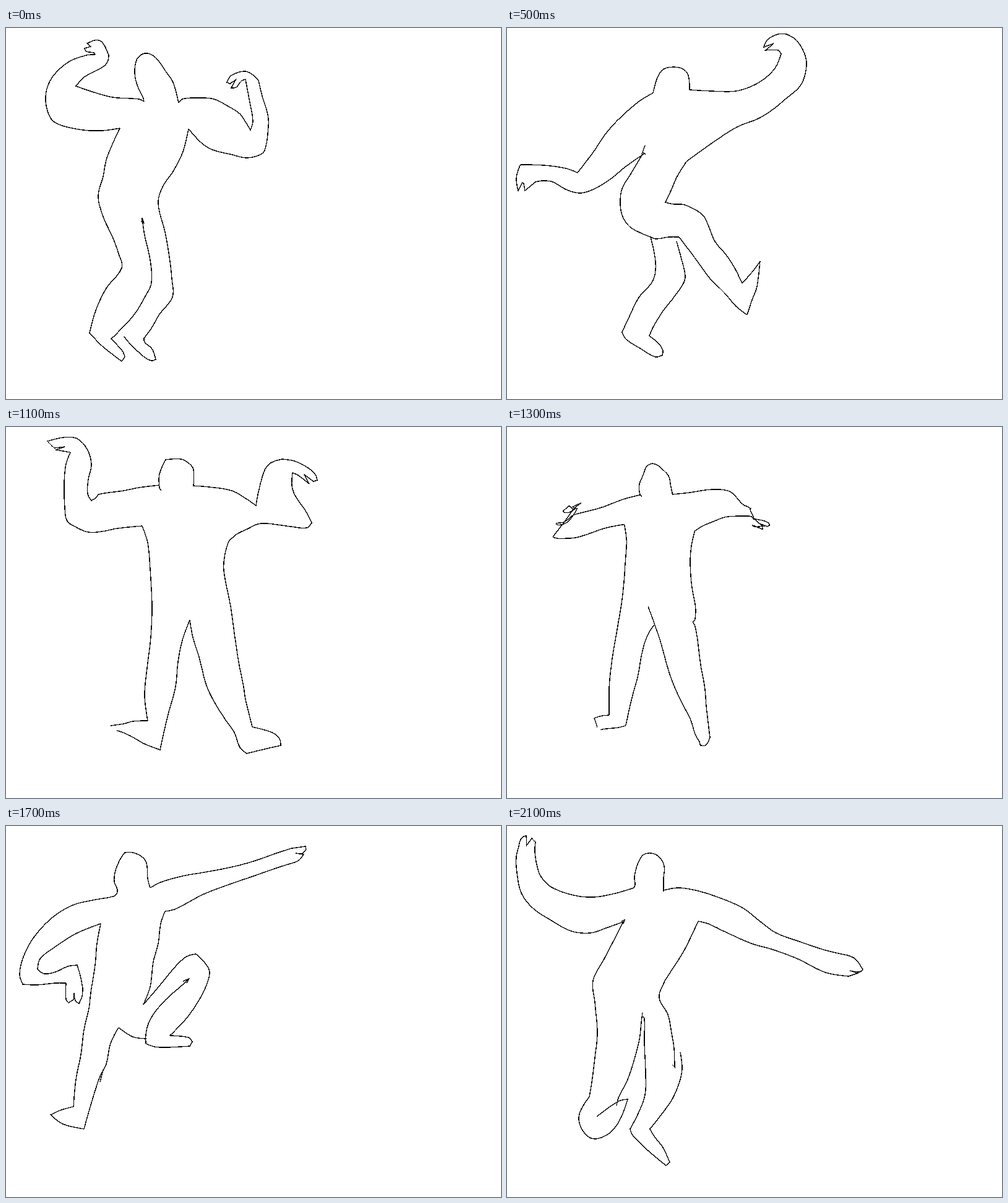
An HTML page that plays this animation: 800 px wide and 600 px high, repeating every 2200 ms.

```html
<!DOCTYPE html>
<html lang="en">
<head>
<meta charset="utf-8">
<title>Dancer</title>
<style>
  html, body { margin: 0; width: 100%; height: 100%; overflow: hidden; background: #fff; }
  svg { display: block; width: 100vw; height: 100vh; }
  path { fill: none; stroke: #000; stroke-width: 1.4; shape-rendering: crispEdges; }
</style>
</head>
<body>
<svg viewBox="0 0 800 600"><path id="ink"/></svg>
<script>
const STEP = 100, STEPS = 22, SAMPLES = 48;

// Strokes are "x,y" points; "/" lifts the pen. An arm is [upper edge, hand, lower edge].
const armsUp = {
  head: '223,119 222,114 212,92 208,72 211,52 219,43 229,41 242,48 258,70 270,88 279,121',
  armL: ['223,119 215,115 172,112 136,102 113,94 127,79 155,64 164,55 166,44',
    '166,44 160,30 153,21 143,20 131,25 137,30 127,33 130,38 142,40 144,43',
    '144,43 130,44 101,55 76,78 65,103 66,130 78,152 118,164 155,166 184,162'],
  armR: ['279,121 285,115 309,113 336,115 358,126 377,138 386,150 395,165 399,150 393,115 387,83',
    '387,83 380,86 372,96 364,97 371,84 362,90 357,88 364,77 385,70 398,75 408,85',
    '408,85 414,110 423,140 424,160 418,198 408,206 388,210 366,205 334,197 315,185 295,163'],
  sideL: '184,162 163,210 157,240 149,272 157,305 173,340 182,365 187,388 162,421 145,457 135,493',
  footL: '135,493 155,514 187,539 192,532 188,522 170,503',
  innerL: '170,503 206,465 225,434 235,412 233,375 224,335 220,308',
  innerR: '220,308 224,335 233,375 235,412 225,434 206,465 170,503',
  footR: '191,499 198,508 222,531 235,538 242,536 236,519 224,508 223,502',
  sideR: '295,163 286,200 270,232 253,257 246,284 257,330 264,370 268,405 269,435 248,463 236,484 223,502',
  ticks: '219,314 220,307 223,316'
};

const kick = {
  head: '236,105 242,83 250,69 260,64 278,64 289,70 294,81 295,100',
  armL: ['236,105 213,119 180,148 158,173 140,200 114,234 95,227 60,222 22,221',
    '22,221 18,230 15,245 18,263 25,250 27,251 29,263 46,249',
    '46,249 58,247 74,249 95,261 117,267 137,262 165,246 192,224 222,203'],
  armR: ['295,100 330,102 370,102 400,92 421,78 435,62 443,42',
    '443,42 438,36 418,36 431,25 415,31 421,19 438,10 452,10',
    '452,10 468,20 481,42 484,62 475,92 450,115 428,133 405,147 372,160 330,187 290,216'],
  sideL: '219,204 200,236 186,260 183,285 187,305 198,321 215,331 232,338 240,378 236,408 213,436 198,466 186,492',
  footL: '186,492 192,503 215,518 240,532 251,529 252,522 245,510 230,498',
  innerL: '230,498 236,484 252,458 270,435 285,413 288,400 281,370 274,345',
  innerR: '232,338 241,341 262,338 278,338 303,371 328,405 352,429 370,450 388,464',
  footR: '388,464 396,440 404,418 409,377 400,390 380,413',
  sideR: '290,216 275,240 265,263 256,282 270,285 287,286 316,302 326,321 336,345 355,368 369,390 380,413',
  ticks: '218,204 223,190 / 220,202 224,204'
};

const walk = {
  head: '270,101 271,88 278,71 290,59 301,65 313,83 319,98 320,117',
  armL: ['268,101 266,97 250,105 230,119 221,138 214,170 208,192', '208,192 206,210', '206,210 207,230 210,250'],
  armR: ['320,117 328,133 335,143 348,157 352,180 352,210 356,236 380,212 400,191 418,183 446,182',
    '446,182 454,190 457,205 453,226 450,208 443,229 433,234 432,215 437,203 431,199',
    '431,199 422,220 406,248 397,270 380,290 360,292 338,284 322,276 306,245 299,215 298,175 301,150 305,147'],
  sideL: '210,250 213,290 219,335 217,365 215,395 217,430 216,455',
  footL: '216,455 212,435 206,422 202,434 203,470 204,494',
  innerL: '204,494 210,498 217,498 228,491 243,463 258,435 268,405 282,375 290,335',
  innerR: '300,306 301,340 309,382 330,413 352,442 375,478 386,510 395,526',
  footR: '395,526 403,529 415,527 432,519 455,507 449,500 434,492 409,487',
  sideR: '363,292 372,320 386,365 395,400 401,440 409,487',
  ticks: '220,457 213,460 210,469 / 290,335 294,327 299,337 294,343 / 291,304 296,301 300,306'
};

const wide = {
  head: '251,103 248,98 248,76 258,53 283,52 297,60 303,69 303,95',
  armL: ['248,94 215,98 190,103 150,109 145,115 138,119 132,108 133,85 138,62 134,42 126,28',
    '126,28 113,18 92,17 67,23 78,34 95,32 81,37 104,41',
    '104,41 97,60 94,90 95,130 99,152 115,163 133,170 155,169 180,164 220,160'],
  armR: ['302,95 328,97 365,103 388,116 404,127 408,105 418,70 428,58 446,52',
    '446,52 466,55 488,66 500,77 503,86 497,88 482,77 490,92 472,78 463,74',
    '463,74 462,95 468,112 485,137 494,155 486,163 460,161 412,156 390,165 372,174 360,185'],
  sideL: '220,160 229,187 233,230 236,290 234,340 228,390 224,435 229,475',
  footL: '229,475 205,476 190,480 169,483',
  innerL: '179,491 186,493 200,499 225,513 249,522 256,490 262,465 274,420 278,380 285,345 297,312',
  innerR: '297,312 302,340 312,372 324,418 338,447 355,474 369,494 378,518 389,528',
  footR: '389,528 418,521 444,515 442,504 430,494 398,485',
  sideR: '360,185 354,205 352,232 363,290 370,340 376,380 384,420 387,440 398,485'
};

const droop = {
  head: '185,123 181,117 180,105 188,90 193,73 200,66 206,70 214,84 221,93 225,108 232,123',
  armL: ['185,125 157,135 120,155 90,167 62,177 40,196 27,218 33,239 55,248 80,243 101,235',
    '101,235 102,246 106,250 113,237 111,250 117,251 128,230 132,215 136,205',
    '136,205 122,205 95,215 72,219 53,221 53,211 75,196 110,175 135,162 159,155'],
  armR: ['232,123 262,116 295,104 328,97 343,99 358,122 368,133 374,150 379,168 375,172 370,208 362,235 350,246',
    '350,246 344,244 346,232 338,240 329,244',
    '329,244 337,215 341,185 338,150 335,128 300,134 270,143 247,151'],
  sideL: '159,155 158,180 150,215 145,240 136,275 124,312 114,352 108,390 105,430 101,457',
  footL: '101,457 88,459 74,466 98,476 123,488',
  innerL: '123,488 130,475 135,445 142,410 152,375 162,345 172,331 180,327',
  innerR: '159,269 172,290 185,325 196,362 206,400 219,437 227,462 233,490',
  footR: '233,490 212,503 195,514 / 188,513 196,517 225,518 258,519',
  sideR: '247,151 242,180 240,215 240,255 246,292 241,313 / 233,311 238,313 244,335 250,390 256,425 257,470 258,519'
};

const kneeUp = {
  head: '179,110 180,103 175,90 177,72 185,53 192,43 205,43 220,50 227,60 229,85 233,100',
  armL: ['179,110 173,114 140,120 108,128 75,148 45,180 28,212 22,240 27,256 50,257 80,254 97,254',
    '97,254 97,280 101,286 110,280 110,270 112,282 118,287 123,275 124,262',
    '124,262 120,242 115,225 100,227 80,236 62,239 51,232 55,215 80,195 115,173 153,158'],
  armR: ['233,100 250,91 285,81 320,75 362,67 400,57 440,43 462,36',
    '462,36 484,33 485,38 479,45 468,44 481,46 474,55 466,59',
    '466,59 440,67 400,81 365,93 320,110 290,126 272,135 257,138'],
  sideL: '153,158 147,190 144,225 137,270 134,295 126,330 121,370 113,410 109,454',
  footL: '109,454 90,459 72,467 92,482 126,490',
  innerL: '126,490 133,465 145,425 152,405 162,385 168,355 175,338 182,326',
  innerR: '295,248 284,258 258,281 240,302 230,320 226,338 226,352',
  footR: '226,352 240,357 260,358 297,356 301,349 295,342 265,339',
  sideR: '257,138 250,158 246,190 238,220 233,260 222,289 250,256 275,226 292,211 307,207 322,222 329,237 322,262 308,288 290,313 265,339',
  ticks: '182,326 205,341 227,344 / 286,251 296,247 292,254 / 152,414 157,394'
};

const swing = {
  head: '205,100 207,95 206,82 211,62 220,47 233,44 246,50 254,65 253,85 253,106',
  armL: ['205,100 175,109 140,115 108,112 72,99 55,82 48,62 45,40 46,26',
    '46,26 40,20 32,31 31,16 27,17 22,22 19,33',
    '19,33 15,50 16,75 23,108 42,133 72,153 104,170 135,173 160,165 188,155'],
  armR: ['253,104 275,100 300,103 335,113 380,132 410,155 435,173 470,186 515,201 550,209',
    '550,209 563,215 575,232 570,236 554,234 567,238 552,243',
    '552,243 515,237 470,215 430,200 395,190 350,170 325,158 309,154'],
  sideL: '188,155 170,190 157,215 139,250 142,285 146,335 142,375 137,415 133,438',
  footL: '133,438 120,458 116,474 122,492 136,505 152,504 170,493 185,470 195,442 183,444 165,455 145,470',
  innerL: '177,452 180,440 195,410 205,380 214,345 217,318 219,302',
  innerR: '219,308 222,312 222,350 224,400 223,435 212,465 199,490',
  footR: '199,490 203,500 228,525 257,549 263,544 252,520 238,502 231,490',
  sideR: '309,154 287,200 265,235 254,253 246,278 260,305 266,335 270,360 271,390 267,386 / 280,366 283,390 280,410 268,440 250,466 231,490',
  ticks: '188,158 190,152 185,154'
};

// Right arm at full stretch on its way down from the kick.
const reach = [
  '301,104 360,106 420,104 480,92 528,84',
  '528,84 545,82 556,90 544,93 553,101 540,106 526,108',
  '526,108 480,126 430,142 380,164 340,188 308,235'
];

const dist = (a, b) => Math.hypot(b[0] - a[0], b[1] - a[1]);
const lerp = (a, b, k) => a.map((v, i) => v + (b[i] - v) * k);

// Unit direction through point i; zero at ends and sharp turns.
function heading(pts, i) {
  const a = pts[i - 1], p = pts[i], b = pts[i + 1];
  if (!a || !b) return [0, 0];
  const before = dist(a, p), after = dist(p, b);
  const dot = (p[0] - a[0]) * (b[0] - p[0]) + (p[1] - a[1]) * (b[1] - p[1]);
  if (dot < 0.64 * before * after) return [0, 0];
  const span = dist(a, b);
  return [(b[0] - a[0]) / span, (b[1] - a[1]) / span];
}

function smooth(pts) {
  const out = [pts[0]], dirs = pts.map((_, i) => heading(pts, i));
  for (let i = 1; i < pts.length; i++) {
    const a = pts[i - 1], b = pts[i], len = dist(a, b);
    for (let n = 1; n <= 6; n++) {
      const t = n / 6, u = 1 - t, ease = t * t * (3 - 2 * t);
      out.push(a.map((v, k) => v + (b[k] - v) * ease
        + len * t * u * (u * dirs[i - 1][k] - t * dirs[i][k])));
    }
  }
  return out;
}

function resample(pts) {
  const at = [0];
  for (let i = 1; i < pts.length; i++) at.push(at[i - 1] + dist(pts[i - 1], pts[i]));
  let i = 1;
  return Array.from({ length: SAMPLES }, (_, n) => {
    const goal = at[at.length - 1] * n / (SAMPLES - 1);
    while (i < pts.length - 1 && at[i] < goal) i++;
    return lerp(pts[i - 1], pts[i], (goal - at[i - 1]) / (at[i] - at[i - 1] || 1));
  });
}

const parse = text => text.split('/').map(piece =>
  smooth(piece.trim().split(' ').map(p => p.split(',').map(Number))));
const toPath = pts => 'M' + pts.map(p => p.map(v => v.toFixed(1)).join(' ')).join('L');

function build(pose) {
  const { head, armL, armR, sideL, footL, innerL, innerR, footR, sideR, ticks } = pose;
  const parts = [...armR, head, ...armL, sideL, footL, innerL, innerR, footR, sideR].map(parse);
  const lines = parts.flat().concat(ticks ? parse(ticks) : []);
  return { lines, joints: parts.map(pieces => resample(pieces.flat())) };
}

function blend(a, b, k) {
  const joints = a.joints.map((part, i) => part.map((p, j) => lerp(p, b.joints[i][j], k)));
  return { lines: joints, joints };
}

const kicking = build(kick), walking = build(walk);
const reaching = blend(kicking, walking, 0.25);
reach.forEach((text, i) => { reaching.joints[i] = resample(parse(text)[0]); });

const keys = [[0, build(armsUp)], [5, kicking], [6, reaching], [9, walking], [11, build(wide)],
  [15, build(droop)], [17, build(kneeUp)], [21, build(swing)]];

function drawing(step) {
  const next = keys.findIndex(([at]) => at >= step);
  const [end, target] = keys[next];
  if (end === step) return target;
  const [start, from] = keys[next - 1];
  return blend(from, target, (step - start) / (end - start));
}

const drawings = Array.from({ length: STEPS }, (_, n) => drawing(n).lines.map(toPath).join(''));
const ink = document.getElementById('ink');
let shown = -1;

function show(ms) {
  const step = Math.floor(ms / STEP) % STEPS;
  if (step !== shown) ink.setAttribute('d', drawings[shown = step]);
}

const begin = performance.now();
function tick() {
  show(performance.now() - begin);
  requestAnimationFrame(tick);
}
tick();
</script>
</body>
</html>
```
